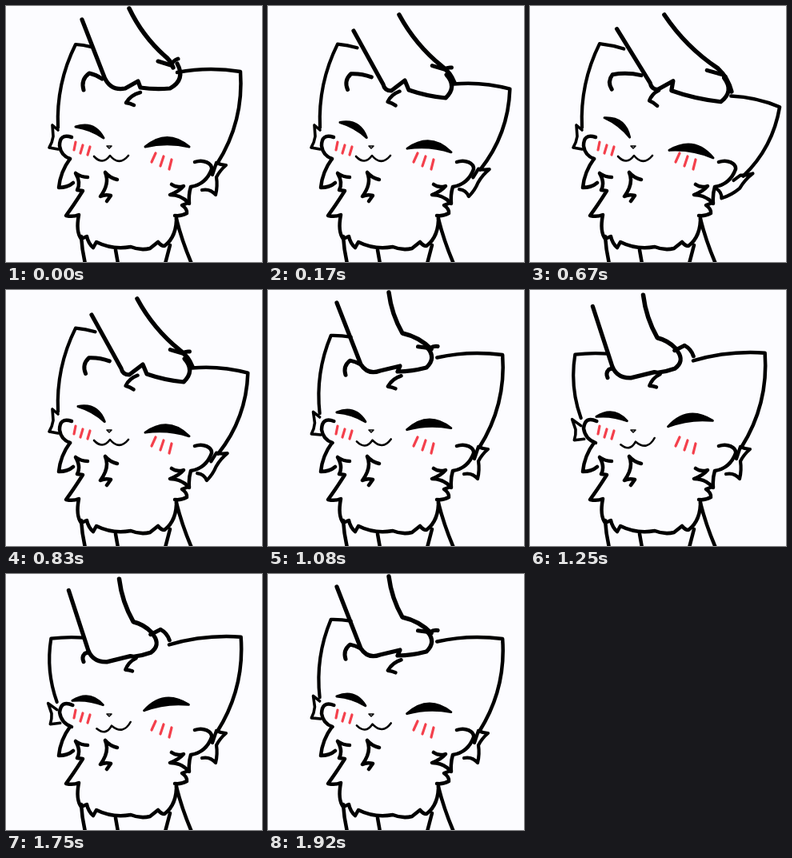
Animation, 320 px wide and 320 px high, one loop 2 s. Source, as an HTML page:

```html
<!DOCTYPE html>
<html>
<head>
<meta charset="utf-8">
<style>
  html, body { margin: 0; height: 100%; overflow: hidden; background: #fcfcff; }
  svg { display: block; width: 100vw; height: 100vh; }
  path { fill: none; stroke: #000; stroke-width: 4.5; stroke-linecap: round; stroke-linejoin: round; }
  .blush { stroke: #f4404c; stroke-width: 3.2; }
  .nose { stroke-width: 1.6; }
  .eye { fill: #000; }
</style>
</head>
<body>
<svg viewBox="0 0 320 320">
  <!-- legs -->
  <path d="M94 288Q95 305 99 322M137 305L140 322M205 299L199 322M213 266Q220 294 232 322"/>
  <!-- chest fur -->
  <path d="M80 191Q68 207 66 227Q77 227 84 221M102 214Q94 214 87 209Q94 221 89 230L96 231Q84 250 75 262Q84 264 91 261Q87 282 94 291L101 288Q103 297 109 302L113 295Q133 305 156 301Q168 306 180 303L190 295Q194 300 198 300Q214 288 213 262"/>
  <path d="M139 217Q130 215 124 208Q130 222 118 238Q124 235 131 237L126 244"/>
  <path d="M207 223Q214 228 222 225Q216 232 205 236Q219 236 228 246L220 249Q227 254 226 259Q219 263 211 262"/>
  <!-- right cheek -->
  <path d="M236 195C247 191 258 197 257 204Q250 223 231 226Q228 236 229 247"/>
  <path class="blush" d="M87 170l-2 10M96 174l-3 10M105 176l-3 10M187 184l-5 11M197 188l-4 12M207 192l-3 12"/>
  <path class="nose" d="M126 175h6l-3 3z"/>
  <g id="moving"></g>
</svg>
<script>
const group = document.getElementById('moving');
const parts = [];
const reach = Math.sin(Math.PI * 5 / 12), lean = Math.sin(Math.PI / 12);

// A part is a chain of arcs through points; each bow bends one arc sideways.
function part(width, bows, keys, poses, ease, name = '') {
  const el = document.createElementNS('http://www.w3.org/2000/svg', 'path');
  el.style.strokeWidth = width;
  el.setAttribute('class', name);
  group.append(el);
  parts.push({ el, bows, keys, ease, poses: poses.map(p => p.split(' ').map(Number)) });
}

// The hand leads the motion, the head follows with a soft start.
const hand = (width, bows, ...poses) =>
  part(width, bows, [-reach, -lean, 0, .5, reach], poses, s => s);
const head = (width, bows, mid, left = mid, right = mid, name) =>
  part(width, bows, [-1, 0, 1], [left, mid, right],
    s => Math.sign(s) * Math.abs(s / reach) ** 1.3, name);
const eye = (...ends) =>
  head(3, [.42, -.12], ...ends.map(e => e + ' ' + e.split(' ', 2).join(' ')), 'eye');

// arm, palm and fingers
hand(5.2, [0, -.4, 0, 0, -.06, -.5],
  '74 23 93 90 118 115 150 107 158 104 171 99 176 79',
  '86 16 116 93 140 101 165 95 162 102 198 97 199 72',
  '95 17 123 89 149 103 165 94 168 102 205 103 214 72',
  '107 31 144 98 154 106 171 93 176 105 222 115 223 86',
  '109 28 152 96 161 104 181 94 177 106 243 121 248 91');
// thumb
head(5, [0, .2], '190 69 206 74 215 66', '176 79 187 67 199 91', '226 82 240 86 249 92');
// back of the arm
hand(5.5, [-.1, .15],
  '136 8 154 63 170 73',
  '151 3 168 54 204 74',
  '154 3 198 62 209 77',
  '164 11 217 75 233 96',
  '169 11 240 79 257 110');
// right ear and its tuft
head(4.5, [.09, .165], '214 83 293 82 264 197', '199 91 294 77 264 197', '257 117 315 133 267 215');
head(4.2, [0, -.1, -.1, .1, -.3],
  '258 211 263 196 275 199 263 214 262 236 245 230', undefined,
  '254 219 263 214 279 211 262 230 236 241 231 228');
// left ear and its tuft
head(4.2, [-.05, -.13], '106 51 87 48 65 152', '93 94 41 97 63 164', '119 54 87 47 65 152');
head(3.6, [0, 0, .1, 0], '65 155 58 149 59 163 54 177 65 179', '63 177 50 168 56 180 56 193 69 190');
// left cheek
head(4.5, [-.7, -.3], '82 164 67 175 80 191', '84 164 67 172 83 191');
// forelock and curl
head(5, [.35, .1], '97 105 104 84 120 91', '97 112 96 107 95 102', '103 104 103 86 142 86');
head(4.5, [-.2, .1], '168 108 150 121 160 124', '160 104 149 119 157 120', '160 105 149 118 159 125');
// face
eye('87 151 122 165', '81 162 121 163', '94 138 125 164');
eye('174 176 229 176', '172 168 228 157', '174 181 229 192');
head(2.6, [-.6, -.6], '110 188 130 187 153 187', '115 196 133 191 157 184');

function draw(step) {
  const swing = Math.sin(step * Math.PI / 12);
  for (const { el, bows, keys, poses, ease } of parts) {
    const s = ease(swing);
    let k = 0;
    while (k < keys.length - 2 && s > keys[k + 1]) k++;
    const f = (s - keys[k]) / (keys[k + 1] - keys[k]);
    const p = poses[k].map((v, i) => v + (poses[k + 1][i] - v) * f);
    let d = `M${p[0]} ${p[1]}`;
    bows.forEach((bow, n) => {
      const [x, y, u, v] = p.slice(2 * n, 2 * n + 4);
      d += `Q${(x + u) / 2 + bow * (v - y)} ${(y + v) / 2 - bow * (u - x)} ${u} ${v}`;
    });
    el.setAttribute('d', d);
  }
}

// 24 held poses per loop, changing on whole hundredths of a second.
function tick() {
  const t = performance.now() % 2000;
  draw(Math.floor((Math.floor(t / 10) + .5) * .12));
  requestAnimationFrame(tick);
}
tick();
</script>
</body>
</html>
```
